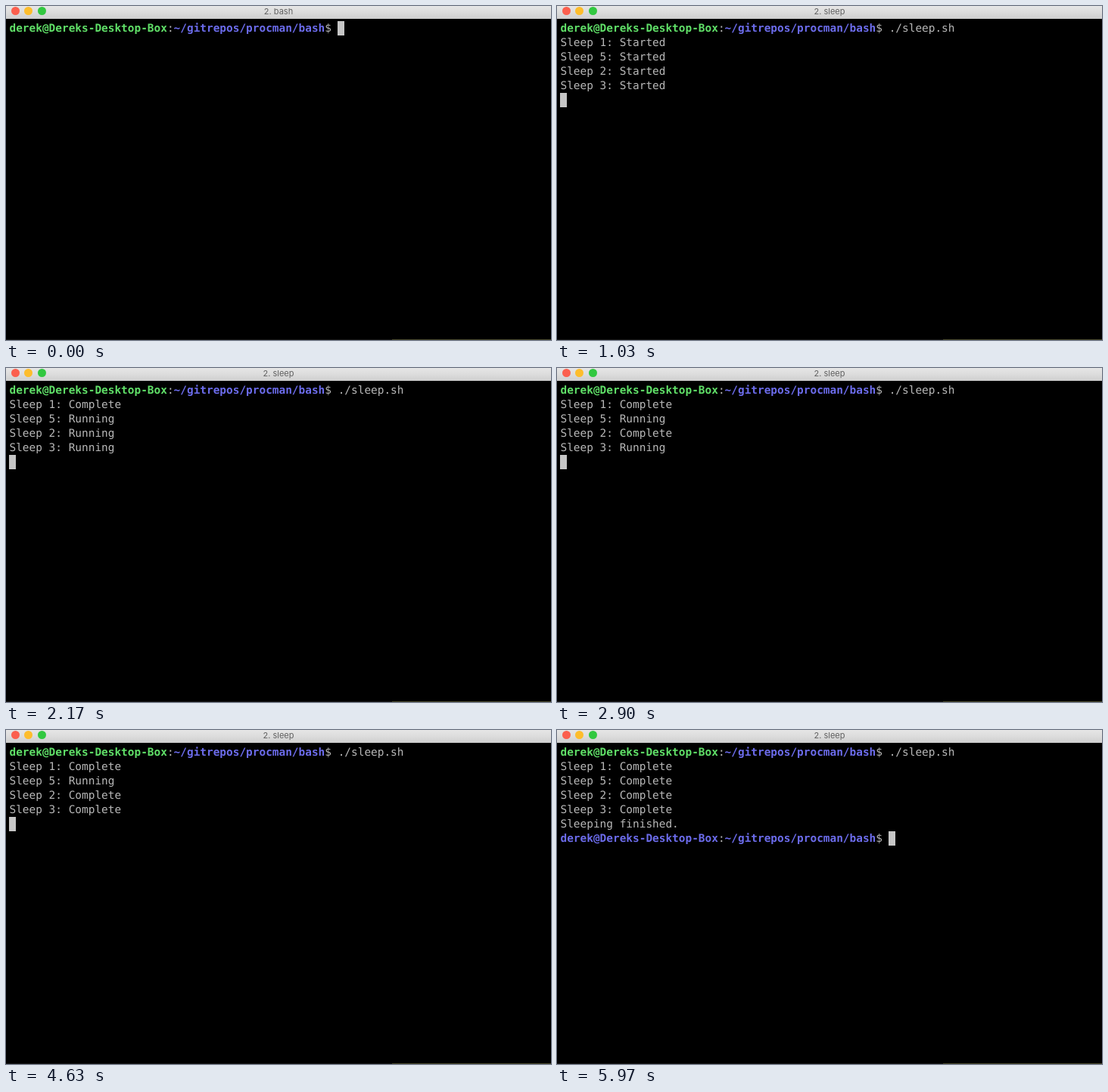
Animation of 720x442 px, one loop 6.01 s. Source, as an HTML page:

```html
<!DOCTYPE html>
<html lang="en">
<head>
<meta charset="utf-8">
<title>Terminal</title>
<style>
  html, body { margin: 0; width: 100%; height: 100%; overflow: hidden; background: #000; }
  #stage { position: relative; width: 720px; height: 442px; overflow: hidden; background: #000; }
  #bar {
    position: absolute; inset: 0 0 auto; height: 17px;
    background: linear-gradient(#e6e6e6, #dcdcdc 50%, #cecece);
    font: 11px/15px Inter, "Liberation Sans", sans-serif;
    color: #606060; text-align: center;
  }
  #bar i { position: absolute; top: 1.3px; width: 11px; height: 11px; border-radius: 50%; }
  #screen {
    position: absolute; left: 4.5px; top: 21px; margin: 0;
    font: 14.43px/19px "DejaVu Sans Mono", monospace;
    text-rendering: geometricPrecision;
    color: #b8b8b8;
  }
  #screen b { color: #60e068; }
  #screen b + b { color: #6c6cec; }
  #screen i {
    display: inline-block; width: 8.5px; height: 18.5px; margin: -1px 0 0 -.5px;
    vertical-align: top; background: #c6c6c6;
  }
  #edge {
    position: absolute; inset: auto 0 0; height: 1px;
    background: linear-gradient(90deg, #161616 510px, #48482c 510px);
  }
</style>
</head>
<body>
<div id="stage">
  <div id="bar">
    <i style="left:6.5px;background:#fb5f4e"></i>
    <i style="left:24px;background:#fdbd2c"></i>
    <i style="left:41.5px;background:#32c840"></i>
    <span id="title"></span>
  </div>
  <pre id="screen"></pre>
  <div id="edge"></div>
</div>
<script>
const LOOP = 6010, ENTER = 760, START = 850, FINISH = 5850;
const TYPE_FROM = 70, TYPE_STEP = 58;
const command = './sleep.sh';
const prompt = '<b>derek@Dereks-Desktop-Box</b>:<b>~/gitrepos/procman/bash</b>$ ';
const cursor = '<i></i>';
// sleep length in seconds, and when it completes
const jobs = [[1, 1930], [5, FINISH], [2, 2900], [3, 3900]];
const RUNNING = jobs[0][1];

const status = (t, end) => t >= end ? 'Complete' : t >= RUNNING ? 'Running' : 'Started';

function render(t) {
  const typed = Math.max(0, Math.floor((t - TYPE_FROM) / TYPE_STEP) + 1);
  const lines = [prompt + command.slice(0, typed)];
  if (t >= START) lines.push(...jobs.map(([n, end]) => `Sleep ${n}: ${status(t, end)}`));
  if (t >= FINISH) lines.push('Sleeping finished.', prompt);
  else if (t >= ENTER) lines.push('');
  return lines.join('\n') + cursor;
}

const screenEl = document.getElementById('screen');
const titleEl = document.getElementById('title');
let shown;

function frame(now) {
  const t = now % LOOP;
  const html = render(t);
  if (html !== shown) {
    screenEl.innerHTML = shown = html;
    titleEl.textContent = t < ENTER ? '2. bash' : '2. sleep';
  }
  requestAnimationFrame(frame);
}
frame(0);
</script>
</body>
</html>
```
